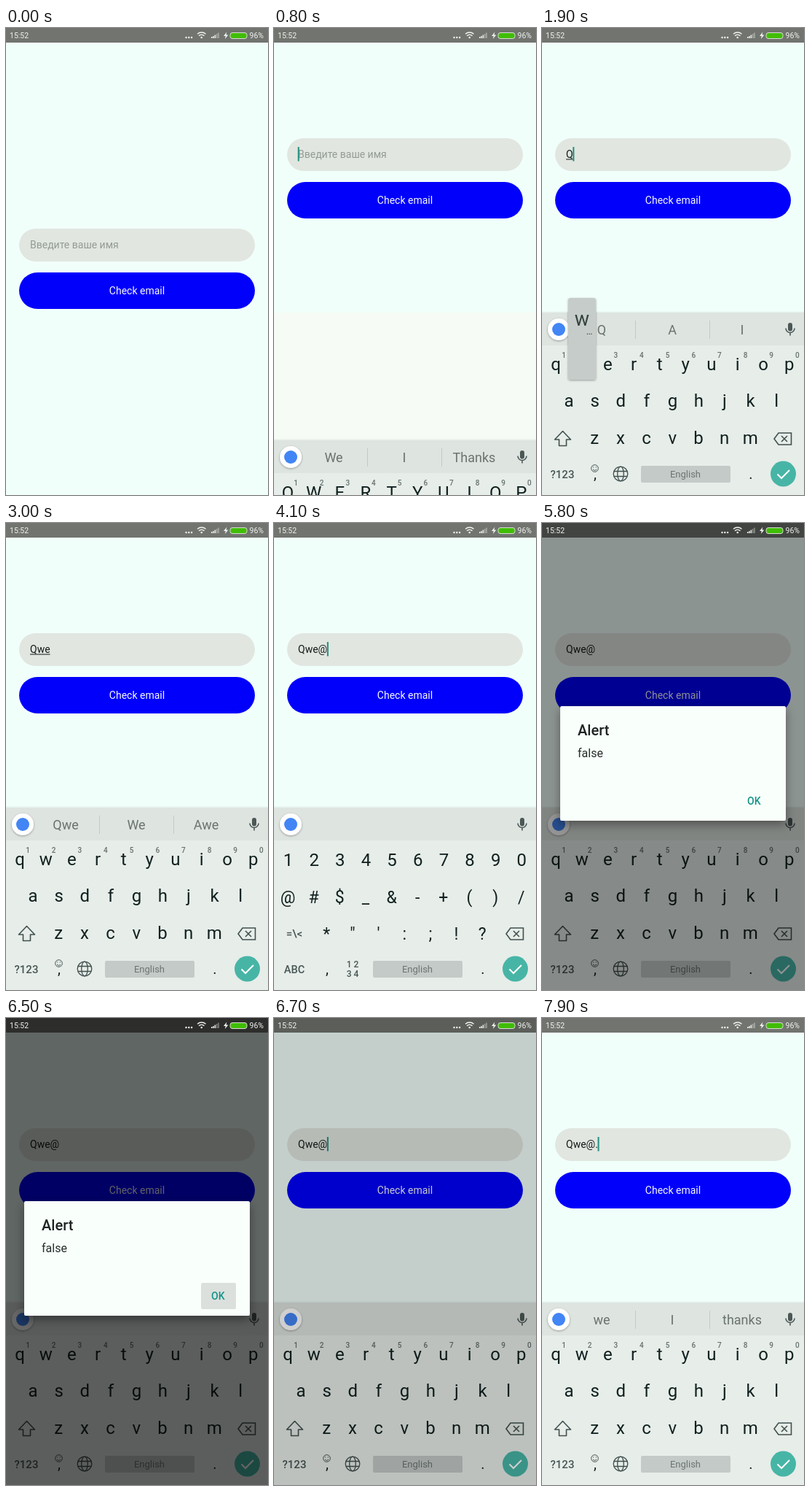
Animation of 360x640 px, one loop 8 s. Source, as an HTML page:

```html
<!DOCTYPE html>
<html lang="ru">
<head>
<meta charset="utf-8">
<title>Email check</title>
<style>
  html, body { margin: 0; width: 100%; height: 100%; overflow: hidden; background: #f1fffb; }
  svg { display: block; width: 360px; height: 640px; }
  text { font-family: Roboto, "Noto Sans", sans-serif; white-space: pre; }
  .mid { text-anchor: middle; }
  .key { font-size: 24px; fill: #10211f; }
  .sign { font-size: 23px; fill: #10211f; }
  .hint { font-size: 10px; font-weight: 500; fill: #66716e; }
  .fn { font-size: 15px; font-weight: 500; fill: #465654; }
  .word { font-size: 18px; fill: #69736f; }
  .line { fill: none; stroke: #40504e; stroke-width: 1.6; }
</style>
</head>
<body>
<svg id="stage" viewBox="0 0 360 640" xmlns="http://www.w3.org/2000/svg">
  <defs>
    <filter id="soft" x="-30%" y="-30%" width="160%" height="160%">
      <feDropShadow dx="0" dy="1" stdDeviation="1.5" flood-opacity=".35"/>
    </filter>
    <filter id="deep" x="-20%" y="-20%" width="140%" height="150%">
      <feDropShadow dx="0" dy="5" stdDeviation="7" flood-opacity=".4"/>
    </filter>
  </defs>

  <rect width="360" height="640" fill="#f1fffb"/>
  <rect id="gap" y="390" width="360" height="250" fill="#f7fbf5"/>
  <rect width="360" height="20" fill="#71746f"/>

  <g id="form">
    <rect x="18" y="151" width="324" height="45" rx="22.5" fill="#e1e6e0"/>
    <text id="hint" x="33" y="178" font-size="14" fill="#949b96">Введите ваше имя</text>
    <text id="value" x="33" y="178" font-size="14" fill="#151b19"></text>
    <rect id="underline" x="33" y="179.5" height="1" fill="#151b19"/>
    <rect id="caret" y="163" width="2" height="19.5" fill="#20907f"/>
    <g id="button">
      <rect x="18" y="211" width="324" height="50" rx="25" fill="#0000fb"/>
      <text class="mid" x="180" y="241" font-size="14" fill="#f6f8ff">Check email</text>
    </g>
  </g>

  <g id="keyboard">
    <rect y="388.5" width="360" height="2" fill="#000" opacity=".05"/>
    <rect y="390" width="360" height="250" fill="#e7ede9"/>
    <rect y="390" width="360" height="45" fill="#dee4e0"/>
    <circle cx="23" cy="413" r="15" fill="#fff" filter="url(#soft)"/>
    <circle cx="23" cy="413" r="9" fill="#4285f4"/>
    <g id="words">
      <path d="M128.5 401V426M230.5 401V426" stroke="#c3cac6"/>
      <text class="mid word" x="82" y="420"></text>
      <text class="mid word" x="179" y="420"></text>
      <text class="mid word" x="275" y="420"></text>
    </g>
    <rect x="338" y="404" width="6" height="11.5" rx="3" fill="#4c5856"/>
    <path d="M335 411.5a6 6 0 0 0 12 0M341 417.5v4" fill="none" stroke="#4c5856" stroke-width="1.6"/>

    <g id="caps"></g>
    <g id="lower"></g>
    <g id="signs"></g>

    <path class="line" d="M325 555h17.5v16H325l-6-8zM329 559l8 8M337 559l-8 8"/>
    <g id="letterRow">
      <path id="shift" class="line" stroke-linejoin="round" d="M28.500 552.500L39.500 564H33.500V572.500H23.500V564H17.500Z"/>
      <text class="mid fn" x="28" y="617">?123</text>
      <g class="line" style="stroke-width:1">
        <circle cx="72.500" cy="603.500" r="4.800"/>
        <path d="M70 605q2.500 3 5 0M70.700 601.300v1.200M74.300 601.300v1.200"/>
      </g>
      <g class="line" style="stroke-width:1.300">
        <circle cx="108" cy="611" r="9.800"/>
        <ellipse cx="108" cy="611" rx="4.300" ry="9.800"/>
        <path d="M99 607.500h18M99 614.500h18"/>
      </g>
    </g>
    <g id="signRow">
      <text class="mid fn" x="28" y="568">=\&lt;</text>
      <text class="mid fn" x="28" y="616.500" style="font-size:14.500px">ABC</text>
      <text class="mid fn" x="108" y="609" style="font-size:12px">1 2</text>
      <text class="mid fn" x="108" y="622" style="font-size:12px">3 4</text>
    </g>
    <text class="mid key" x="73" y="618" style="font-size:20px">,</text>
    <rect x="136" y="600" width="123" height="23" rx="2" fill="#c4cac7"/>
    <text class="mid" x="197" y="616" font-size="13" fill="#6b7572">English</text>
    <text class="mid key" x="287" y="618" style="font-size:20px">.</text>
    <circle cx="331.500" cy="611" r="17.500" fill="#47b5a6"/>
    <path d="M323.500 611.500l5.500 5.500 11-11" fill="none" stroke="#fff" stroke-width="2"/>
  </g>

  <g id="popup">
    <rect x="-19" y="-91" width="38" height="112" rx="3" fill="#c6ccc9" filter="url(#soft)"/>
    <text id="popKey" class="mid" y="-53" font-size="27" fill="#33423f"></text>
    <text class="mid" x="10" y="-41" font-size="13" fill="#33423f">…</text>
  </g>

  <rect id="dim" width="360" height="640"/>
  <g id="dialog">
    <rect x="25" y="251" width="310" height="157" rx="2" fill="#f9fffb" filter="url(#deep)"/>
    <text x="49" y="291" font-size="20" font-weight="500" fill="#1d2321">Alert</text>
    <text x="49" y="321" font-size="16" fill="#262c2a">false</text>
    <rect id="press" x="268" y="363" width="48" height="36" rx="2" fill="#000" opacity=".12"/>
    <text x="282" y="386" font-size="14" font-weight="500" fill="#15958a">OK</text>
  </g>

  <g fill="#f1f3f0">
    <text x="5" y="14" font-size="10.500">15:52</text>
    <text x="334.500" y="14" font-size="10.500">96%</text>
    <circle cx="247.500" cy="13" r="1.200"/><circle cx="251.300" cy="13" r="1.200"/><circle cx="255.100" cy="13" r="1.200"/>
    <circle cx="268.700" cy="13" r="1.300"/>
    <path d="M263 8.200a8.500 8.500 0 0 1 11.500 0M265 10.700a5.500 5.500 0 0 1 7.500 0" fill="none" stroke="#f1f3f0" stroke-width="1.400"/>
    <path d="M282 12h1.500v2H282zM284.300 11h1.500v3h-1.500zM286.600 9.500h1.500v4.500h-1.500z"/>
    <path d="M288.900 8h1.500v6h-1.500zM291.200 6.500h1.500v7.500h-1.500z" opacity=".45"/>
    <path d="M303.300 5.500l-4.300 5.500h2.800l-1 4 4.500-5.500h-2.800z"/>
    <rect x="308" y="6.500" width="23" height="8" rx="3" fill="#40bd05" stroke="#d9ddd6"/>
  </g>
</svg>
<script>
  const LOOP = 8000, STEP = 100;
  const $ = id => document.getElementById(id);
  const show = (id, on) => $(id).style.display = on ? '' : 'none';
  const fade = (id, v) => $(id).setAttribute('opacity', v);
  const clamp = v => Math.max(0, Math.min(1, v));
  const within = (t, spans) => spans.some(([a, b]) => t >= a && t < b);

  // Latest entry whose time has come; each entry is [time, value].
  const latest = (t, list) => list.reduce((v, e) => t >= e[0] ? e[1] : v, undefined);

  // Linear interpolation through [time, value] points.
  function track(t, pts) {
    let v = pts[0][1];
    for (let i = 1; i < pts.length; i++) {
      const [a, x] = pts[i - 1], [b, y] = pts[i];
      if (t >= a) v = x + (y - x) * clamp((t - a) / (b - a));
    }
    return v;
  }

  function addText(parent, cls, x, y, str) {
    const el = document.createElementNS('http://www.w3.org/2000/svg', 'text');
    el.setAttribute('class', 'mid ' + cls);
    el.setAttribute('x', x);
    el.setAttribute('y', y);
    el.textContent = str;
    parent.append(el);
  }

  function addRow(id, cls, str, x, y) {
    [...str].forEach((c, i) => addText($(id), cls, x + i * 35.65, y, c));
  }

  const rows = ['qwertyuiop', 'asdfghjkl', 'zxcvbnm'];
  const lefts = [19, 37, 72.3], bases = [469, 518.5, 570];
  rows.forEach((r, i) => {
    addRow('lower', 'key', r, lefts[i], bases[i]);
    addRow('caps', 'key', r.toUpperCase(), lefts[i], bases[i] + (i ? 0.5 : 1));
  });
  for (const id of ['lower', 'caps']) addRow(id, 'hint', '1234567890', 30, 452);
  addRow('signs', 'key', '1234567890', 19.5, 470);
  addRow('signs', 'sign', '@#$_&-+()/', 19, 520.5);
  addRow('signs', 'sign', '*"\':;!?', 72.3, 571);

  const typed = [[0, ''], [1700, 'Q'], [2000, 'Qw'], [2400, 'Qwe'], [3900, 'Qwe@'], [7700, 'Qwe@.']];
  const offers = [
    [0, ['We', 'I', 'Thanks']], [1700, ['Q', 'A', 'I']], [2000, ['Qw', 'We', 'Q']],
    [2400, ['Qwe', 'We', 'Awe']], [3900, null], [7700, ['we', 'I', 'thanks']]
  ];
  const layers = [[0, 'caps'], [1700, 'lower'], [3400, 'signs'], [5700, 'lower']];
  // Key, centre x, centre y, pressed from, pressed until
  const taps = [
    ['Q', 19, 461, 1500, 1700], ['w', 55, 461, 1800, 2000], ['e', 90, 461, 2200, 2400],
    ['@', 19, 512, 3900, 4000], ['.', 287, 611, 7600, 7700]
  ];
  const caretOn = [[500, 1000], [1500, 2900], [3400, 4400], [4900, 5700], [6700, 7200], [7600, LOOP]];
  const dimming = [[5600, 0], [5700, .2], [5800, .42], [5900, .55], [6000, .6],
                   [6500, .6], [6600, .4], [6700, .19], [6800, .06], [6900, 0]];
  const dialogFade = [[5600, 0], [5700, .55], [5800, 1], [6500, 1], [6600, .4], [6700, 0]];

  function draw(t) {
    const open = t >= 700;
    $('form').setAttribute('transform', `translate(0 ${open ? 0 : 124})`);
    show('gap', open);
    show('keyboard', open);
    const slide = 250 * Math.pow(1 - clamp((t - 700) / 400), 1.24);
    $('keyboard').setAttribute('transform', `translate(0 ${slide})`);

    const text = latest(t, typed);
    $('value').textContent = text;
    show('hint', !text);
    const width = text ? $('value').getComputedTextLength() : 0;
    $('underline').setAttribute('width', width);
    show('underline', t >= 1700 && t < 3900);
    $('caret').setAttribute('x', 32.7 + width);
    show('caret', within(t, caretOn));
    fade('button', track(t, [[5500, 1], [5600, .5], [5800, 1]]));

    const layer = latest(t, layers);
    for (const id of ['caps', 'lower', 'signs']) show(id, id === layer);
    show('signRow', layer === 'signs');
    show('letterRow', layer !== 'signs');
    $('shift').style.fill = layer === 'caps' ? '#40504e' : 'none';

    const words = latest(t, offers);
    show('words', words);
    if (words) $('words').querySelectorAll('text').forEach((el, i) => el.textContent = words[i]);

    const tap = taps.find(p => t >= p[3] && t < p[4]);
    show('popup', tap);
    if (tap) {
      $('popKey').textContent = tap[0];
      $('popup').setAttribute('transform', `translate(${tap[1]} ${tap[2]})`);
    }

    fade('dim', track(t, dimming));
    fade('dialog', track(t, dialogFade));
    show('press', t >= 6500);
  }

  const start = performance.now();
  function tick() {
    const t = (performance.now() - start) % LOOP;
    draw(Math.floor(t / STEP) * STEP);
    requestAnimationFrame(tick);
  }
  tick();
</script>
</body>
</html>
```
